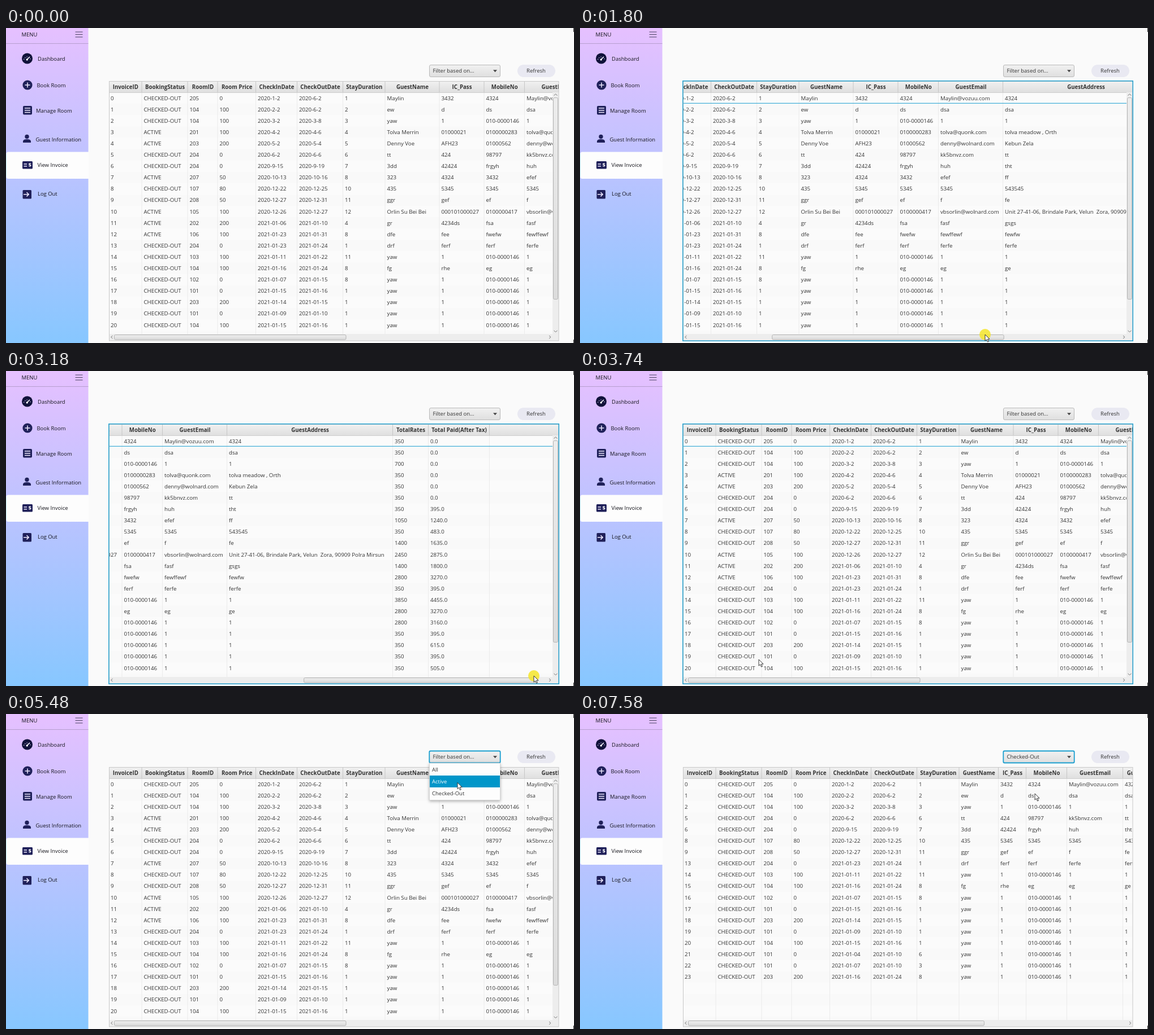
An HTML page for the animation above (8 s loop, 1004 px wide and 558 px high).

```html
<!DOCTYPE html>
<html lang="en">
<head>
<meta charset="utf-8">
<title>View Invoice</title>
<style>
  html, body { margin: 0; width: 100%; height: 100%; overflow: hidden; background: #fafafa; }
  svg { display: block; }
  text { font: 9.7px "Open Sans", "Noto Sans", sans-serif; fill: #333; white-space: pre; }
  .head { font-weight: 700; text-anchor: middle; }
  .menu text { font-size: 9.45px; fill: #15151c; }
  .ui text { font-size: 9.5px; }
  .icon { fill: #20215a; }
  .pale { fill: none; stroke: #eeeaff; stroke-width: 1.5; }
  .chevron { fill: none; stroke: #777; }
  .thumb { fill: url(#thumb); stroke: #b4b4b4; }
  .focus { fill: none; stroke: #1a9fd0; }
</style>
</head>
<body>
<svg id="stage" width="1004" height="558" viewBox="0 0 1004 558">
  <defs>
    <linearGradient id="side" x2="0" y2="1">
      <stop stop-color="#e6c0ff"/><stop offset="1" stop-color="#87c7ff"/>
    </linearGradient>
    <linearGradient id="header" x2="0" y2="1">
      <stop stop-color="#f1f1f1"/><stop offset="1" stop-color="#dfdfdf"/>
    </linearGradient>
    <linearGradient id="thumb" x2="0" y2="1">
      <stop stop-color="#ededed"/><stop offset="1" stop-color="#dcdcdc"/>
    </linearGradient>
    <filter id="shadow" x="-10%" y="-10%" width="120%" height="130%">
      <feDropShadow dx="0" dy="2" stdDeviation="2.5" flood-opacity=".3"/>
    </filter>
  </defs>

  <rect width="1004" height="558" fill="#fafafa"/>
  <path d="M1003.5 0v7M1003.5 552v6" stroke="#222"/>

  <g class="menu">
    <rect width="145.5" height="558" fill="url(#side)"/>
    <path d="M0 27.5H145.5" stroke="#b79fd0"/>
    <path d="M122.5 7h13M122.5 11.5h13M122.5 16h13" stroke="#4a4260" stroke-width="1.2"/>
    <path d="M146 219.5H4q-3.5 0-3.5 3.5v40.500q0 3.500 3.500 3.500H146z" fill="#fdfdfd"/>
    <path d="M.5 223v40" stroke="#c5eef8"/>

    <circle cx="37.500" cy="54" r="9.500" fill="#11123a"/>
    <path d="M37 56l5-5" stroke="#fff" stroke-width="1.600"/>
    <path d="M31.500 56a6.200 6.200 0 0 1 12 0" fill="none" stroke="#d9d3f5" stroke-width="1.300" stroke-dasharray="1.300 2.200"/>
    <circle cx="37.200" cy="56" r="1.700" fill="#fff"/>

    <circle class="icon" cx="38" cy="101" r="8.600"/>
    <path class="pale" d="M33.500 101h9M38 96.500v9"/>

    <rect class="icon" x="30" y="138" width="16" height="15.500" rx="2"/>
    <path class="pale" d="M33 142h10M33 145.700h10M33 149.400h10"/>

    <circle class="icon" cx="37" cy="192.500" r="3.700"/>
    <path class="icon" d="M30 203v-2q0-4 7-4t7 4v2z"/>

    <rect class="icon" x="29" y="236" width="18" height="13.500" rx="1.500"/>
    <path class="pale" d="M31.500 241h5.500M31.500 244.700h5.500"/>
    <text x="39.500" y="246.300" style="fill:#fff;font-weight:700">$</text>

    <rect class="icon" x="29.500" y="287" width="15.500" height="15.500" rx="1.500"/>
    <path class="pale" d="M31 294.700h9M36.500 291l3.700 3.700l-3.700 3.700"/>

    <text x="27.500" y="14.500">MENU</text>
    <text x="56" y="57.700">Dashboard</text>
    <text x="54.500" y="104.500">Book Room</text>
    <text x="53" y="150">Manage Room</text>
    <text x="52.500" y="201">Guest Information</text>
    <text x="55.500" y="246">View Invoice</text>
    <text x="56" y="296.700">Log Out</text>
  </g>

  <g id="tables"></g>
  <rect id="tableFocus" class="focus" x="181.800" y="93.800" width="795.500" height="460.400" stroke-width="1.400"/>

  <g class="ui">
    <rect x="904" y="65" width="67" height="22" rx="11" fill="#e9e9f2"/>
    <text x="937" y="79.300" text-anchor="middle">Refresh</text>
    <rect x="748.500" y="65.500" width="125" height="21" rx="2.500" fill="url(#header)" stroke="#b9b9b9"/>
    <rect id="comboFocus" class="focus" x="748.300" y="65.500" width="125.400" height="21" rx="2" stroke-width="1.800"/>
    <text id="comboLabel" x="754.500" y="79.300"></text>
    <path d="M861 74.300h7l-3.500 4z" fill="#444"/>
    <g id="popup">
      <rect x="748.500" y="87" width="125" height="65.500" fill="#fdfdfd" stroke="#d0d0d0" stroke-width=".8" filter="url(#shadow)"/>
    </g>
  </g>

  <g id="cursor">
    <circle id="press" r="10" fill="#f4e52a" opacity=".85"/>
    <path d="M0 0v11.200l2.600-2.400l1.900 4.300l1.900-.8l-1.900-4.200h3.600z" fill="#fff" stroke="#222" stroke-width=".9"/>
  </g>
</svg>

<script>
const LOOP = 8000, LEFT = 182, PITCH = 20.1;
const HEADS = ['InvoiceID', 'BookingStatus', 'RoomID', 'Room Price', 'CheckInDate', 'CheckOutDate', 'StayDuration',
  'GuestName', 'IC_Pass', 'MobileNo', 'GuestEmail', 'GuestAddress', 'TotalRates', 'Total Paid(After Tax)', ''];
const REPEAT_GUEST = 'yaw|1|010-0000146|1|1';

// status, room, price, check-in, check-out, stay | guest | rates and paid
const BOOKINGS = [
  ['C 205 0 2020-1-2 2020-6-2 1', 'Maylin|3432|4324|Maylin@vozuu.com|4324', '350 0.0'],
  ['C 104 100 2020-2-2 2020-6-2 2', 'ew|d|ds|dsa|dsa', '350 0.0'],
  ['C 104 100 2020-3-2 2020-3-8 3', REPEAT_GUEST, '700 0.0'],
  ['A 201 100 2020-4-2 2020-4-6 4', 'Tolva Merrin|01000021|0100000283|tolva@quonk.com|tolva meadow , Orth', '350 0.0'],
  ['A 203 200 2020-5-2 2020-5-4 5', 'Denny Voe|AFH23|01000562|denny@wolnard.com|Kebun Zela', '350 0.0'],
  ['C 204 0 2020-6-2 2020-6-6 6', 'tt|424|98797|kk5bnvz.com|tt', '350 0.0'],
  ['C 204 0 2020-9-15 2020-9-19 7', '3dd|42424|frgyh|huh|tht', '350 395.0'],
  ['A 207 50 2020-10-13 2020-10-16 8', '323|4324|3432|efef|ff', '1050 1240.0'],
  ['C 107 80 2020-12-22 2020-12-25 10', '435|5345|5345|5345|543545', '350 483.0'],
  ['C 208 50 2020-12-27 2020-12-31 11', 'ggr|gef|ef|f|fe', '1400 1635.0'],
  ['A 105 100 2020-12-26 2020-12-27 12', 'Orlin Su Bei Bei|000101000027|0100000417|vbsorlin@wolnard.com|Unit 27-41-06, Brindale Park, Velun  Zora, 90909 Polra Mirsun', '2450 2875.0'],
  ['A 202 200 2021-01-06 2021-01-10 4', 'gr|4234ds|fsa|fasf|gsgs', '1400 1800.0'],
  ['A 106 100 2021-01-23 2021-01-31 8', 'dfe|fee|fwefw|fewffewf|fewfw', '2800 3270.0'],
  ['C 204 0 2021-01-23 2021-01-24 1', 'drf|ferf|ferf|ferfe|ferfe', '350 395.0'],
  ['C 103 100 2021-01-11 2021-01-22 11', REPEAT_GUEST, '3850 4455.0'],
  ['C 104 100 2021-01-16 2021-01-24 8', 'fg|rhe|eg|eg|ge', '2800 3270.0'],
  ['C 102 0 2021-01-07 2021-01-15 8', REPEAT_GUEST, '2800 3160.0'],
  ['C 101 0 2021-01-15 2021-01-16 1', REPEAT_GUEST, '350 395.0'],
  ['C 203 200 2021-01-14 2021-01-15 1', REPEAT_GUEST, '350 615.0'],
  ['C 101 0 2021-01-09 2021-01-10 1', REPEAT_GUEST, '350 395.0'],
  ['C 104 100 2021-01-15 2021-01-16 1', REPEAT_GUEST, '350 505.0'],
  ['C 101 0 2021-01-04 2021-01-10 6', REPEAT_GUEST, ''],
  ['C 101 0 2021-01-07 2021-01-10 3', REPEAT_GUEST, ''],
  ['C 203 200 2021-01-16 2021-01-24 8', REPEAT_GUEST, '']
].map(([stay, guest, money], id) => {
  const [status, ...rest] = stay.split(' ');
  return [String(id), status === 'C' ? 'CHECKED-OUT' : 'ACTIVE', ...rest, ...guest.split('|'), ...money.split(' ')];
});

// Widths of the guest columns, name to address, refitted to each filter
const FILTERS = [
  { option: 'All', label: 'Filter based on...', guest: [96, 79, 71.5, 114, 293], keep: () => true },
  { option: 'Active', label: 'Active', guest: [96, 79, 69, 114, 293], keep: r => r[1] === 'ACTIVE' },
  { option: 'Checked-Out', label: 'Checked-Out', guest: [69.5, 49, 72, 99, 80], keep: r => r[1] !== 'ACTIVE' }
];

const $ = id => document.getElementById(id);
function add(parent, tag, attrs, text) {
  const node = document.createElementNS('http://www.w3.org/2000/svg', tag);
  for (const name in attrs) node.setAttribute(name, attrs[name]);
  if (text) node.textContent = text;
  return parent.appendChild(node);
}
const show = (node, on) => node.style.display = on ? '' : 'none';

function clipped(parent, id, x, y, right, bottom) {
  add(add(parent, 'clipPath', { id }), 'rect', { x, y, width: right - x, height: bottom - y });
  return add(add(parent, 'g', { 'clip-path': `url(#${id})` }), 'g', {});
}

function buildTable({ guest, keep }, index) {
  const widths = [58.5, 81, 53, 67.5, 73, 81, 74.5, ...guest, 63, 108, 150];
  const rows = BOOKINGS.filter(keep);
  const tall = rows.length > 21;
  const right = tall ? 966 : 977;
  const content = widths.reduce((a, b) => a + b);
  const root = add($('tables'), 'g', {});

  add(root, 'rect', { x: 182.5, y: 94.5, width: 794.5, height: 459.5, fill: '#fbfbfb' });
  add(root, 'rect', { x: LEFT, y: 94, width: 795, height: 20, fill: 'url(#header)' });
  const head = clipped(root, 'head' + index, LEFT, 94, 977, 115);
  const body = clipped(root, 'body' + index, LEFT, 114, right, 542);

  for (let i = 1; i < 22; i += 2)
    add(body, 'rect', { x: LEFT, y: 114 + i * PITCH, width: content, height: PITCH, fill: '#f9f9f9' });
  let x = LEFT;
  widths.forEach((w, c) => {
    add(head, 'text', { class: 'head', x: x + w / 2, y: 107.7 }, HEADS[c]);
    add(head, 'path', { d: `M${x + w - .5} 95v19`, stroke: '#c6c6c6' });
    add(body, 'path', { d: `M${x + w - .5} 114V542`, stroke: '#ebebeb' });
    rows.forEach((row, r) => row[c] && add(body, 'text', { x: x + 3, y: 127.5 + r * PITCH }, row[c]));
    x += w;
  });
  const rowFocus = add(body, 'rect', { class: 'focus', x: 182.5, y: 114.5, width: content - 1, height: 18.8 });
  add(root, 'path', { d: 'M182 114.5H977', stroke: '#cfcfcf' });

  add(root, 'rect', { x: LEFT, y: 542, width: 795, height: 12, fill: '#ededed' });
  add(root, 'path', { class: 'chevron', d: `M188.500 545l-3 2.500l3 2.500M${right - 6} 545l3 2.500l-3 2.500` });
  if (tall) {
    add(root, 'rect', { x: 966, y: 114, width: 11, height: 428, fill: '#ededed' });
    add(root, 'path', { class: 'chevron', d: 'M968.500 119.500l3-2.500l3 2.500M968.500 536l3 2.500l3-2.500' });
    add(root, 'rect', { class: 'thumb', x: 967.5, y: 123.5, width: 8, height: 357, rx: 2 });
  }
  const view = right - LEFT, track = right - 200, length = track * view / content;
  const thumb = add(root, 'rect', { class: 'thumb', x: 191.5, y: 543.5, width: length - 1, height: 8.5, rx: 2 });
  add(root, 'rect', { x: 182.5, y: 94.5, width: 794.5, height: 459.5, fill: 'none', stroke: '#c8c8c8' });

  return {
    root, rowFocus,
    scroll(offset) {
      for (const part of [head, body]) part.setAttribute('transform', `translate(${-offset})`);
      thumb.setAttribute('x', 191.5 + offset * (track - length) / (content - view));
    }
  };
}

const tables = FILTERS.map(buildTable);
const options = FILTERS.map(({ option }, i) => ({
  bar: add($('popup'), 'rect', { x: 749, y: 88 + i * 21, width: 124, height: 21, fill: '#0096c9' }),
  text: add($('popup'), 'text', { x: 753, y: 102 + i * 21 }, option)
}));

// Bursts of screen updates: first, last, count
const BURSTS = [[150, 930, 11], [1020, 1440, 6], [1490, 1800, 5], [1870, 2200, 5], [2330, 2500, 4], [2730, 2880, 3],
  [3180, 3740, 8], [3820, 3900, 2], [3990, 4540, 8], [4690, 4940, 4], [5180, 5480, 5], [5630, 6100, 7],
  [6350, 6570, 4], [6810, 7430, 9], [7580, 7580, 1]];
const POINTER = [[150, 862, 518], [460, 700, 532], [780, 537, 539], [930, 546, 540], [1020, 558, 543], [1440, 565, 544],
  [1800, 716, 543], [2200, 831, 538], [2500, 923, 539], [2730, 923, 539], [2880, 935, 539], [3180, 933, 540],
  [3580, 540, 538], [3740, 316, 511], [3900, 300, 490], [4461, 800, 80], [4540, 802, 78], [4690, 802, 83],
  [4940, 801, 101], [5180, 800, 106], [5480, 798, 121.5], [5630, 798, 121.5], [6100, 803, 79], [6570, 803, 79],
  [6810, 803, 83], [7430, 804, 141]];
const SCROLL = [[1020, 0], [1356, 2], [1440, 12.6], [1800, 283], [2200, 509], [2500, 679], [2880, 679], [3180, 640], [3580, 0]];
const PRESSED = [[1020, 2700], [3180, 3600], [4440, 4500], [5630, 5690], [6350, 6400], [7430, 7570]];
const POPUP = [[4440, 5690], [6400, 7570]];

function snap(t) {
  const burst = BURSTS.findLast(b => b[0] <= t);
  if (!burst) return 0;
  const [first, last, count] = burst;
  if (t >= last) return last;
  const step = (last - first) / (count - 1);
  return first + Math.floor((t - first) / step + 1e-6) * step;
}

function sample(keys, t) {
  const i = keys.findIndex(k => k[0] > t);
  if (i === 0) return keys[0].slice(1);
  if (i < 0) return keys.at(-1).slice(1);
  const a = keys[i - 1], b = keys[i], p = (t - a[0]) / (b[0] - a[0]);
  return a.slice(1).map((v, n) => v + (b[n + 1] - v) * p);
}
const within = (spans, t) => spans.some(([a, b]) => t >= a && t < b);

function render(time) {
  const t = snap(time);
  const [x, y] = sample(POINTER, t);
  const current = t < 5690 ? 0 : t < 7570 ? 1 : 2;
  const tableFocused = t >= 1020 && t < 4440;

  tables.forEach((table, i) => {
    show(table.root, i === current);
    show(table.rowFocus, tableFocused);
  });
  tables[0].scroll(sample(SCROLL, t)[0]);
  show($('tableFocus'), tableFocused);
  show($('comboFocus'), t >= 4440);
  $('comboLabel').textContent = FILTERS[current].label;

  show($('popup'), within(POPUP, t));
  const hovered = Math.floor((y - 88) / 21);
  options.forEach(({ bar, text }, i) => {
    const lit = i === hovered || (current > 0 && i === current);
    show(bar, lit);
    text.style.fill = lit ? '#fff' : '#333';
  });

  show($('cursor'), t >= 150);
  show($('press'), within(PRESSED, t));
  $('cursor').setAttribute('transform', `translate(${x} ${y})`);
}

const start = performance.now();
function tick() {
  render((performance.now() - start) % LOOP);
  requestAnimationFrame(tick);
}
tick();
</script>
</body>
</html>
```
